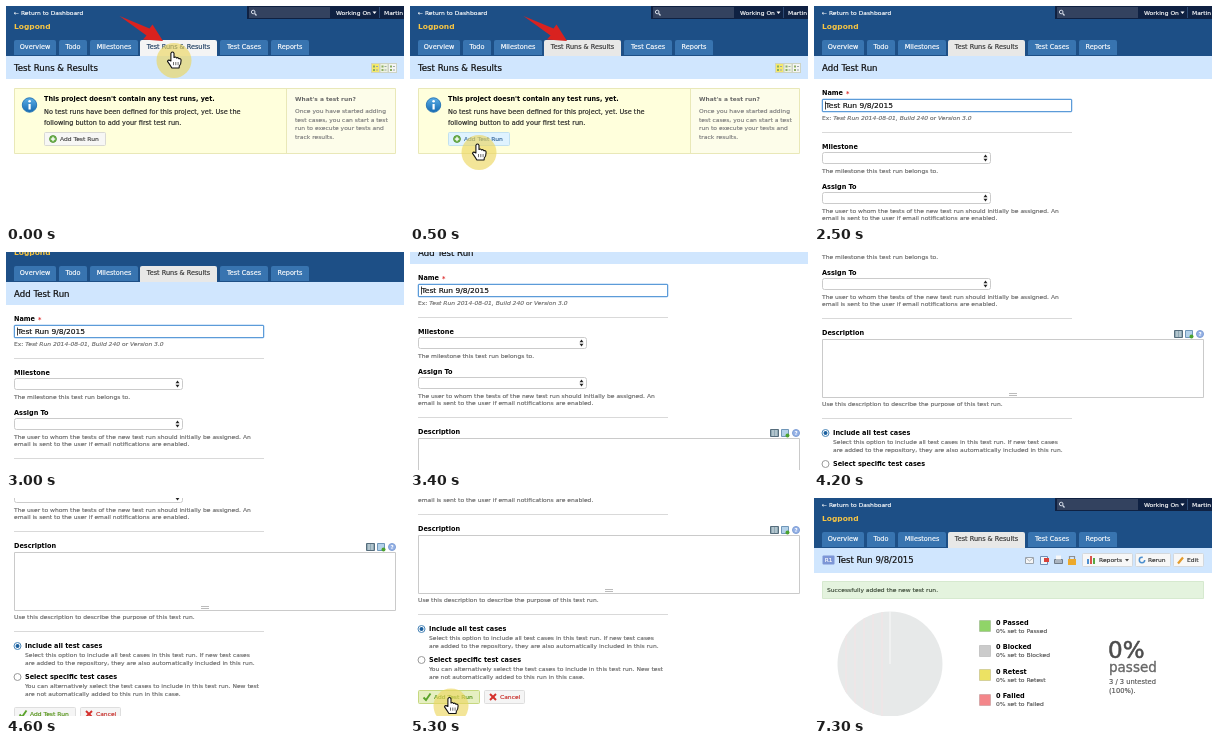
Animation of 398 by 218 pixels, one loop 8000 ms. Source, as an HTML page with a canvas:

```html
<!DOCTYPE html>
<html lang="en">
<head>
<meta charset="utf-8">
<title>Add a test run</title>
<style>
html, body { margin: 0; width: 100%; height: 100%; overflow: hidden; background: #fff; }
canvas { display: block; }
</style>
</head>
<body>
<canvas id="stage" width="398" height="218"></canvas>
<script>
const W = 398, H = 218, LOOP = 8000;
const c = document.getElementById('stage').getContext('2d');
const FONT = '"DejaVu Sans", Verdana, sans-serif';
const INK = '#111', HINT = '#6a6a6a';

// Text is laid out large and scaled down to keep fractional letter widths.
// A hairline outline gives it the slightly heavy look of smoothed type.
const ZOOM = 8;
function text(str, x, y, size, color = INK, style = '', align = 'left') {
  c.save();
  c.translate(x, y + size * 0.36);
  c.scale(1 / ZOOM, 1 / ZOOM);
  c.font = `${style} ${size * ZOOM}px ${FONT}`;
  c.textAlign = align;
  c.fillStyle = c.strokeStyle = color;
  c.lineWidth = size * 0.2;
  c.lineJoin = 'round';
  c.fillText(str, 0, 0);
  if (style !== 'bold') c.strokeText(str, 0, 0);
  const width = c.measureText(str).width / ZOOM;
  c.restore();
  return x + width;
}
const bold = (str, x, y, size = 6.5, color = '#000') => text(str, x, y, size, color, 'bold');
function lines(list, x, y, step, size, color) {
  list.forEach((s, i) => text(s, x, y + i * step, size, color));
}

function rect(x, y, w, h, fill) {
  c.fillStyle = fill;
  c.fillRect(x, y, w, h);
}
function box(x, y, w, h, fill, stroke, r = 0) {
  c.beginPath();
  c.roundRect(x + 0.5, y + 0.5, w - 1, h - 1, r);
  c.fillStyle = fill;
  c.fill();
  if (stroke) {
    c.strokeStyle = stroke;
    c.lineWidth = 1;
    c.stroke();
  }
}
function disc(x, y, r, fill, stroke) {
  c.beginPath();
  c.arc(x, y, r, 0, Math.PI * 2);
  c.fillStyle = fill;
  c.fill();
  if (stroke) {
    c.strokeStyle = stroke;
    c.lineWidth = 1;
    c.stroke();
  }
}
function poly(points, fill) {
  c.beginPath();
  points.forEach(([x, y]) => c.lineTo(x, y));
  c.closePath();
  c.fillStyle = fill;
  c.fill();
}
function stroke(points, color, width) {
  c.beginPath();
  points.forEach(([x, y]) => c.lineTo(x, y));
  c.strokeStyle = color;
  c.lineWidth = width;
  c.stroke();
}
const down = (x, y, color) => poly([[x - 2, y - 1], [x + 2, y - 1], [x, y + 1.5]], color);

const TABS = [
  ['Overview', 8, 42], ['Todo', 53, 28], ['Milestones', 84, 48],
  ['Test Runs & Results', 134, 77], ['Test Cases', 214, 48], ['Reports', 265, 38]
];

function header(tabHover) {
  rect(0, 0, W, 50, '#1d4f86');
  text('← Return to Dashboard', 8, 6.5, 6, '#fff');
  bold('Logpond', 8, 20.5, 7.5, '#f6c544');
  rect(241, 0, 157, 13, '#0f2142');
  rect(243, 1, 81, 11, '#33425f');
  disc(247.2, 6, 1.8, '#33425f', '#d5dce8');
  stroke([[248.7, 7.5], [250.5, 9.5]], '#d5dce8', 1.2);
  text('Working On', 330, 6.5, 6, '#fff');
  down(368.5, 6.5, '#fff');
  rect(373, 1, 1, 11, '#2d4a74');
  text('Martin', 378, 6.5, 6, '#fff');
  TABS.forEach(([name, x, w], i) => {
    const on = i === 3;
    c.beginPath();
    c.roundRect(x, 34, w, on ? 16 : 15, [2, 2, 0, 0]);
    c.fillStyle = !on ? '#3874b0' : tabHover ? '#f4f4f4' : '#e8e8e7';
    c.fill();
    text(name, x + w / 2, 41, 6.5, !on ? '#fff' : tabHover ? '#1c3c60' : '#333', '', 'center');
  });
}

function titleBar(title, x, size, h = 23) {
  rect(0, 50, W, h, '#d0e6fe');
  text(title, x, 62, size);
}

function button(label, x, y, w, textX, look) {
  box(x, y, w, 14, look[0], look[1], 1);
  text(label, textX, y + 7, 6, look[2]);
}

function emptyPage(hover) {
  header(!hover);
  titleBar('Test Runs & Results', 8, 8.6);
  ['#f5e96a', '#eef3df', '#f5f5f3'].forEach((fill, i) => {
    const x = 365 + i * 8.5;
    rect(x, 57, 9, 10, '#cdd3c4');
    rect(x + 1, 58, 7, 8, fill);
    rect(x + 2, 59.5, 2, 2, '#8cad62');
    rect(x + 2, 63, 2, 2, '#8cad62');
    rect(x + 5, 60, 2, 1, '#9aa5ac');
    rect(x + 5, 63.5, 2, 1, '#9aa5ac');
  });

  box(8, 82, 382, 66, '#ffffdc', '#e9e8b8');
  rect(281, 83, 108, 64, '#fdfdea');
  rect(280, 83, 1, 64, '#e9e8b8');
  const g = c.createLinearGradient(0, 91, 0, 107);
  g.addColorStop(0, '#5fb2ea');
  g.addColorStop(1, '#1266ae');
  disc(23.5, 99, 7.2, g, '#2a78b8');
  rect(22.5, 98, 2.2, 5.5, '#fff');
  disc(23.6, 95.3, 1.3, '#fff');

  bold("This project doesn't contain any test runs, yet.", 38, 92.3, 6.45);
  lines(['No test runs have been defined for this project, yet. Use the',
    'following button to add your first test run.'], 38, 105.8, 10.7, 6.53, '#222');
  button('Add Test Run', 38, 126, 62, 54,
    hover ? ['#dff3ff', '#c2e1ef', '#336699'] : ['#f7f7f5', '#d9d9d4', '#444']);
  disc(47, 133, 3.4, '#6db24c', '#5a9a3c');
  rect(44.8, 132.4, 4.4, 1.3, '#fff');
  rect(46.35, 130.8, 1.3, 4.4, '#fff');

  bold("What's a test run?", 289, 92.8, 5.9, '#666');
  lines(['Once you have started adding', 'test cases, you can start a test',
    'run to execute your tests and', 'track results.'], 289, 105.3, 8.5, 6, '#7c7c7c');

  poly([[113.5, 10], [143.5, 22.5], [146.5, 18.5], [157, 35], [137, 33.5], [140.5, 29.5]], '#d9221f');
}

function dropdown(y) {
  box(8, y, 169, 12, '#fff', '#cbcbcb', 2);
  poly([[169.5, y + 5.2], [173.5, y + 5.2], [171.5, y + 2.6]], '#222');
  poly([[169.5, y + 6.8], [173.5, y + 6.8], [171.5, y + 9.4]], '#222');
}
function radio(y, on) {
  disc(11.5, y, 3.5, '#fff', on ? '#4a86b8' : '#9a9a9a');
  if (on) disc(11.5, y, 2, '#1a5f9e');
}
const rule = y => rect(8, y, 250, 1, '#d9d9d9');

function formPage(scroll, hover) {
  c.save();
  c.translate(0, -scroll);
  header();
  titleBar('Add Test Run', 8, 8.6);

  const star = bold('Name', 8, 86.8);
  bold('*', star + 3, 87.3, 6.5, '#d33');
  box(7, 92, 252, 15, '#a9cdf2', '', 2);
  box(8, 93, 250, 13, '#fff', '#5c9bd8');
  text('Test Run 9/8/2015', 11.5, 99.5, 7.5, '#111');
  rect(11, 95.5, 0.8, 8, '#111');
  let x = text('Ex: ', 8, 112, 6, HINT);
  x = text('Test Run 2014-08-01, Build 240', x, 112, 6, HINT, 'italic');
  x = text(' or ', x, 112, 6, HINT);
  text('Version 3.0', x, 112, 6, HINT, 'italic');
  rule(126);

  bold('Milestone', 8, 141);
  dropdown(146);
  text('The milestone this test run belongs to.', 8, 164.4, 6, HINT);
  bold('Assign To', 8, 180.7);
  dropdown(186);
  lines(['The user to whom the tests of the new test run should initially be assigned. An',
    'email is sent to the user if email notifications are enabled.'], 8, 204.4, 7.9, 6, HINT);
  rule(226);

  bold('Description', 8, 240.5);
  box(360, 238, 9, 8, '#8fa9b4', '#566d7c');
  rect(362.5, 239, 1, 6, '#d5dfe6');
  rect(365.5, 239, 1, 6, '#d5dfe6');
  box(371, 238, 8, 8, '#b4d2ea', '#6f96b8');
  disc(377.5, 244.5, 2, '#4ba22f');
  disc(386, 242, 3.5, '#96b2e6', '#7f9fd6');
  text('?', 386, 242, 5.5, '#fff', 'bold', 'center');
  box(8, 247, 382, 59, '#fff', '#cacaca');
  rect(195, 301, 8, 1, '#bbb');
  rect(195, 303, 8, 1, '#bbb');
  text('Use this description to describe the purpose of this test run.', 8, 311.5, 6, HINT);
  rule(326);

  radio(341, true);
  bold('Include all test cases', 19, 340.8);
  lines(['Select this option to include all test cases in this test run. If new test cases',
    'are added to the repository, they are also automatically included in this run.'],
    19, 350.2, 8, 6, HINT);
  radio(372, false);
  bold('Select specific test cases', 19, 372);
  lines(['You can alternatively select the test cases to include in this test run. New test',
    'are not automatically added to this run in this case.'], 19, 381, 8, 6, HINT);

  button('Add Test Run', 8, 402, 62, 24,
    hover ? ['#e6efc2', '#c6d880', '#529214'] : ['#f5f5f5', '#dedede', '#529214']);
  stroke([[13.5, 409.5], [16, 412], [20.5, 405.5]], '#5aa32a', 1.9);
  button('Cancel', 74, 402, 41, 90, ['#f5f5f5', '#dedede', '#c8302c']);
  stroke([[80, 406], [86, 412]], '#d5302c', 1.9);
  stroke([[86, 406], [80, 412]], '#d5302c', 1.9);
  c.restore();
}

const LEGEND = [['Passed', '#90d468'], ['Blocked', '#cbcbcb'], ['Retest', '#ece263'], ['Failed', '#f4868a']];

function resultPage() {
  header();
  titleBar('Test Run 9/8/2015', 23, 8.5, 25);
  box(8, 57, 13, 10, '#7d96d6', '', 1);
  text('R1', 14.5, 62, 5.8, '#fff', '', 'center');

  box(211, 59, 9, 7, '#f6f6f6', '#9aa3ac');
  stroke([[212, 60], [215.5, 63], [219, 60]], '#9aa3ac', 0.8);
  box(226, 58, 8, 9, '#f2f6fb', '#6f8db5');
  rect(230, 60, 5, 4, '#d8413a');
  box(240, 61, 9, 5, '#aab4c0', '#6f7b88');
  rect(242, 57.5, 5, 4, '#f8f8f8');
  stroke([[255.5, 62], [255.5, 58.5], [260.5, 58.5], [260.5, 62]], '#8f8f8f', 1.2);
  rect(254, 61, 8, 6, '#eba92e');

  const plain = ['#f7f7f7', '#d3d8dd', '#333'];
  button('Reports', 268, 55, 51, 285, plain);
  rect(273, 61, 2, 5, '#4d8fd0');
  rect(276, 58, 2, 8, '#d9534a');
  rect(279, 60, 2, 6, '#58a846');
  down(313, 62, '#444');
  button('Rerun', 321, 55, 36, 334, plain);
  c.beginPath();
  c.arc(328, 62, 2.7, 0, 5);
  c.strokeStyle = '#4c8fce';
  c.lineWidth = 1.5;
  c.stroke();
  button('Edit', 359, 55, 31, 373, plain);
  stroke([[364, 65.5], [369, 59.5]], '#e39b2c', 2.2);

  box(8, 83, 382, 18, '#e4f3de', '#d6e9cf');
  text('Successfully added the new test run.', 13, 92, 6, '#3c4a38');

  disc(76, 166, 52.5, '#e7e9e9');
  c.save();
  c.beginPath();
  c.arc(76, 166, 52.5, 0, Math.PI * 2);
  c.clip();
  for (let i = 0; i < 5; i++) rect(31 + i * 9, 113, 2, 106, '#eee6e7');
  c.restore();
  rect(75.5, 113, 1, 53, '#fafafa');

  LEGEND.forEach(([name, color], i) => {
    const y = 128 + i * 24.5;
    box(165, Math.round(y - 6), 12, 12, color, '#00000022');
    bold('0 ' + name, 182, y - 3.5);
    text('0% set to ' + name, 182, y + 4.6, 6, '#555');
  });
  text('0%', 294, 152, 23, '#4d4d4d');
  text('passed', 295, 169, 13.5, '#666');
  lines(['3 / 3 untested', '(100%).'], 295, 184, 9, 6.7, '#555');
}

// Pointing hand, with its fingertip at x, y, over a yellow halo
function pointer(x, y) {
  c.globalAlpha = 0.64;
  disc(x + 1.5, y + 8.5, 17.5, '#ecd75e');
  c.globalAlpha = 1;
  c.save();
  c.translate(x, y);
  c.beginPath();
  c.moveTo(-1.6, 9);
  c.lineTo(-1.6, 1.2);
  c.quadraticCurveTo(0, -1.2, 1.5, 1.2);
  c.lineTo(1.5, 5.5);
  c.quadraticCurveTo(3, 4.3, 4, 6);
  c.quadraticCurveTo(5.6, 5, 6.4, 6.8);
  c.quadraticCurveTo(8.6, 6.2, 8.6, 8.4);
  c.quadraticCurveTo(8.6, 12, 6.8, 14);
  c.lineTo(6.6, 16);
  c.lineTo(-0.6, 16);
  c.quadraticCurveTo(-2.4, 13, -5, 9.4);
  c.quadraticCurveTo(-4.4, 7, -1.6, 9);
  c.closePath();
  c.fillStyle = '#fff';
  c.fill();
  c.strokeStyle = '#111';
  c.lineWidth = 1.1;
  c.lineJoin = 'round';
  c.stroke();
  for (const k of [1, 3.3, 5.6]) stroke([[k, 10], [k, 13.2]], '#333', 0.7);
  c.restore();
}

const SCROLL = [
  [3000, 20], [3200, 41], [3400, 61], [3600, 82], [3800, 111],
  [4000, 135], [4200, 160], [4400, 177], [4600, 193], [4800, 210]
];
const scrollAt = t => SCROLL.reduce((s, [at, y]) => t >= at ? y : s, 0);

function draw(t) {
  rect(0, 0, W, H, '#fff');
  if (t < 500) {
    emptyPage(false);
    pointer(166.5, 46);
  } else if (t < 2500) {
    emptyPage(true);
    pointer(67.5, 138);
  } else if (t < 7300) {
    formPage(scrollAt(t), t >= 5300);
    if (t >= 5300) pointer(39.5, 199.5);
  } else {
    resultPage();
  }
}

const start = performance.now();
function tick() {
  draw((performance.now() - start) % LOOP);
  requestAnimationFrame(tick);
}
tick();
</script>
</body>
</html>
```
